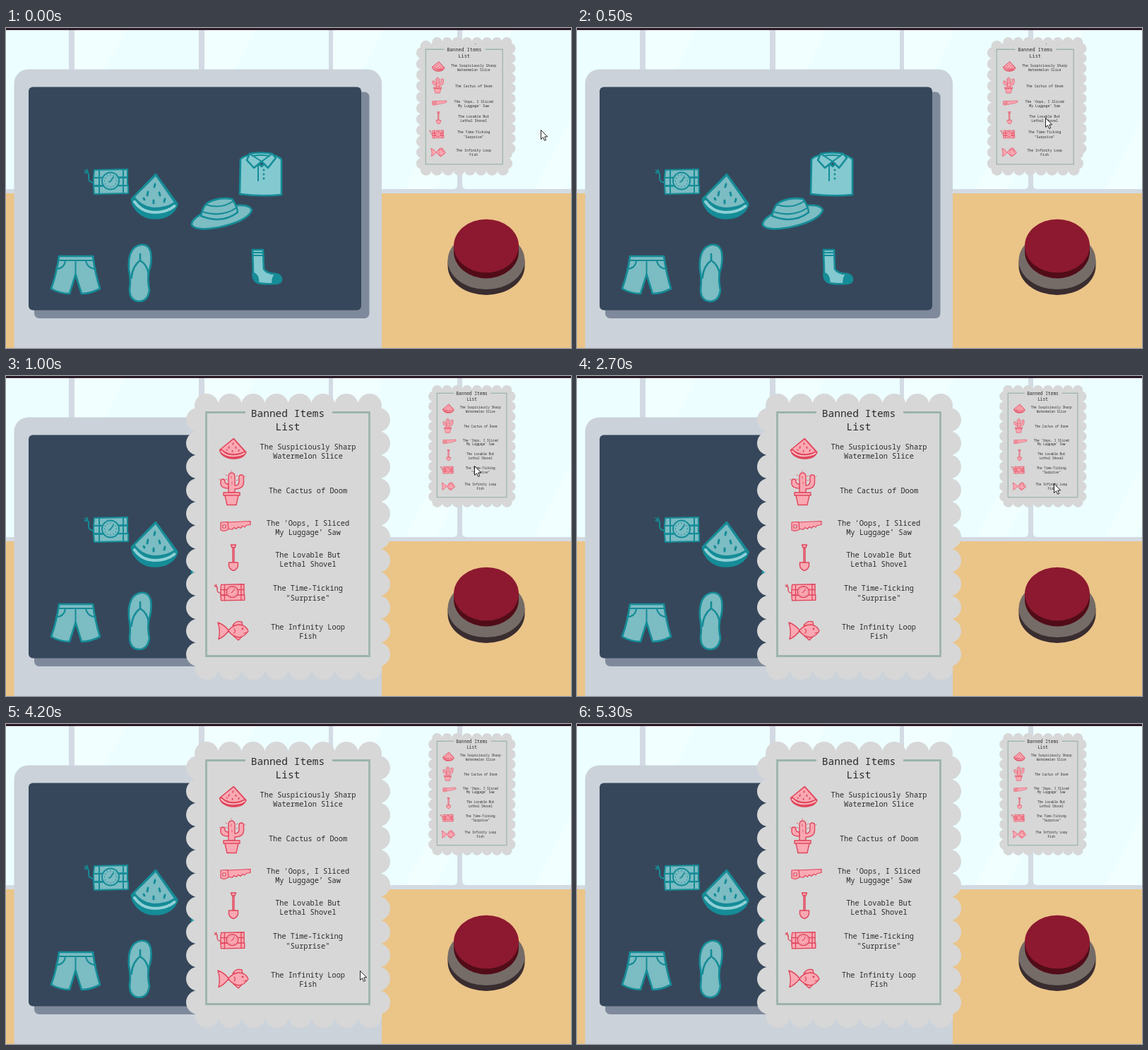
An HTML page for the animation above (5900 ms loop, 800 px wide and 453 px high).

```html
<!DOCTYPE html>
<html lang="en">
<head>
<meta charset="utf-8">
<title>Banned Items List</title>
<style>
  html, body { margin: 0; width: 100%; height: 100%; overflow: hidden; background: #ebc488; }
  svg { display: block; width: 800px; height: 453px; }
  text { font-family: "Noto Sans Mono", "DejaVu Sans Mono", monospace; text-anchor: middle; fill: #2b2b2b; }
  .notes { font-size: 10.3px; }
  .title { font-size: 14.5px; }
  .icon { fill: var(--fill); stroke: var(--line); stroke-linejoin: round; stroke-linecap: round; }
  .teal { --fill: #7cbcc3; --line: #158c97; --pale: #8fd0d6; stroke-width: 2.6; }
  .pink { --fill: #f9a9b3; --line: #e0465c; --pale: #fbc4ca; stroke-width: 1.4; }
  .open { fill: none; }
  .solid { fill: var(--line); }
  .pale { fill: none; stroke: var(--pale); }
  .light { fill: #84c9d0; }
  .closed { animation: hide 5.9s step-end infinite; }
  .opened { animation: show 5.9s step-end infinite; }
  #cursor { animation: move 5.9s step-end infinite; }

  @keyframes hide { 0% { opacity: 1 } 15.25%, 100% { opacity: 0 } }
  @keyframes show { 0% { opacity: 0 } 15.25%, 100% { opacity: 1 } }
  @keyframes move {
    0% { transform: translate(757px, 144px) }
    1.69% { transform: translate(746px, 143px) }
    3.38% { transform: translate(717px, 138px) }
    5.08% { transform: translate(688px, 131px) }
    6.77% { transform: translate(668px, 128px) }
    8.47% { transform: translate(663px, 127px) }
    45.76% { transform: translate(675px, 152px) }
    47.45% { transform: translate(705px, 182px) }
    49.15% { transform: translate(740px, 196px) }
    50.84% { transform: translate(754px, 197px) }
    59.32% { transform: translate(696px, 233px) }
    61.01% { transform: translate(620px, 262px) }
    62.71% { transform: translate(540px, 284px) }
    64.40% { transform: translate(470px, 295px) }
    66.10% { transform: translate(418px, 299px) }
    67.79% { transform: translate(397px, 299px) }
    69.49% { transform: translate(440px, 315px) }
    71.18% { transform: translate(501px, 349px) }
    72.88% { transform: translate(554px, 370px) }
    74.57% { transform: translate(518px, 377px) }
    76.27% { transform: translate(455px, 377px) }
    77.96% { transform: translate(421px, 377px) }
    84.74% { transform: translate(458px, 300px) }
    86.44% { transform: translate(540px, 160px) }
    88.13% { transform: translate(618px, 13px) }
    89.83%, 100% { transform: translate(640px, -40px) }
  }
</style>
</head>
<body>
<svg viewBox="0 0 800 453">
  <defs>
    <g id="pane">
      <rect width="176" height="236" rx="5" fill="#ecfeff"/>
      <path d="M8 0H78L0 150V16ZM176 92V176L146 236H102Z" fill="#fff" opacity=".25"/>
    </g>

    <g id="melon">
      <path class="solid" d="M212 207L178 242C180 258 194 269.500 210 269.500C227 269.500 239 262 242.500 249Z"/>
      <path class="pale" d="M182 246Q192 260.500 210 261Q228 261 238.500 252" stroke-width="4"/>
      <path d="M212 208.500L181.500 239Q192 253.500 210 255Q227 255 239 247Z" stroke-width="1.800"/>
      <path class="open" d="M211 221l-1 4M201 232l-1 5M217 233l1 4M195 241l1 2M209 244v4M225 242l-1 4" stroke-width="3"/>
    </g>

    <g id="bomb">
      <path d="M125 201L172 200V211L124 212ZM124 212H172V223H124ZM124 224L173 223V234L125 235Z"/>
      <path class="open" d="M132 201V235M166 200V234M124 219Q116 218 117 211Q118 206 114 203"/>
      <path class="open" d="M111 201l5 3M115 200l-2 6M111 205l5-3" stroke-width="1.300"/>
      <circle cx="148" cy="216.500" r="12"/>
      <circle cx="148" cy="216.500" r="8.500" stroke-width="1.400" stroke-dasharray=".1 4.300"/>
      <path class="open" d="M148 217l4-6M148 217l-2 1" stroke-width="1.800"/>
    </g>

    <g id="poster">
      <path d="M268 41.500H531V413.500H268Z" fill="#d7d7d7"/>
      <g fill="none" stroke="#d7d7d7" stroke-width="34" stroke-linecap="round">
        <path d="M284 42H515.500M515.500 413H284" stroke-dasharray="0 33"/>
        <path d="M272 62V394.500M527 62V394.500" stroke-dasharray="0 33.200"/>
      </g>
      <path d="M339 51.500H283.500V396.500H514.500V51.500H462" fill="none" stroke="#9cb4aa" stroke-width="2.800"/>

      <g class="title">
        <text x="399" y="58">Banned Items</text>
        <text x="399" y="77">List</text>
      </g>
      <g class="notes">
        <text x="427.500" y="103.500">The Suspiciously Sharp</text>
        <text x="427.500" y="117">Watermelon Slice</text>
        <text x="427.500" y="165.500">The Cactus of Doom</text>
        <text x="427.500" y="211.500">The ‘Oops, I Sliced</text>
        <text x="427.500" y="225">My Luggage’ Saw</text>
        <text x="427.500" y="257">The Lovable But</text>
        <text x="427.500" y="270">Lethal Shovel</text>
        <text x="427.500" y="304">The Time-Ticking</text>
        <text x="427.500" y="317.500">"Surprise"</text>
        <text x="427.500" y="358.500">The Infinity Loop</text>
        <text x="427.500" y="372">Fish</text>
      </g>

      <g class="icon pink">
        <use href="#melon" transform="translate(302 88) scale(.58 .46) translate(-177 -206)" stroke-width="2.600"/>
        <!-- cactus -->
        <path d="M315 165V143Q315 137 319.500 137Q324 137 324 143V155Q330 155 330 149V143Q330 140 333 140Q336.500 140 336.500 143V151Q336 160 324 160V165Z"/>
        <path d="M315 159Q305 159 304 153V149Q304 146 307 146Q310 146 310 149Q310 153 315 153Z"/>
        <path d="M308 165H331V169H308ZM310 169H329L326 182.500H313Z"/>
        <path class="open" d="M319 142v3M320 150v3M313 141l-2-1M313 147l-2-1M326 142l2-1M326 148l2-1M303 147l-1-1M338 143l1-1M319 135v-1" stroke-width=".8"/>
        <!-- saw -->
        <path d="M314 207L346 205.500V210.500L340 211.500L338 214L335 212.500L332 215.500L329 213.500L326 216.500L323 214.500L320 217.500L314 216Z" stroke-width="1.200"/>
        <path d="M304 207L314 206.500L315 217Q309 221 304 218ZM307 211H311V215H307Z" fill-rule="evenodd" stroke-width="1.200"/>
        <!-- shovel -->
        <path d="M321 243H323V264H321ZM318.500 239H325.500L324 243H320Z"/>
        <path d="M315.500 264H328.500V269Q327 274 322 275.500Q317 274 315.500 269Z"/>
        <use href="#bomb" transform="translate(320.500 306) scale(.69 .66) translate(-148 -217)" stroke-width="2"/>
        <!-- fish -->
        <path d="M321 353Q326 345.500 334 348L335 354ZM322 368L329 374L335 368Z"/>
        <path d="M300 349Q309 352 315 360Q322 352 331 352Q340 353 343 361Q338 369 330 370Q321 369 315 361Q309 369 301 372.500Q304 361 300 349Z"/>
        <path class="open" d="M323 358q3 3 0 6M337 364l4-1" stroke-width="1.200"/>
        <circle class="solid" cx="335" cy="358" r=".7"/>
      </g>
    </g>
  </defs>

  <!-- room -->
  <rect width="800" height="453" fill="#ebc488"/>
  <rect width="800" height="234" fill="#d3dae3"/>
  <use href="#pane" x="-87" y="-8"/>
  <use href="#pane" x="97" y="-8"/>
  <use href="#pane" x="281" y="-8"/>
  <use href="#pane" x="463" y="-8"/>
  <use href="#pane" x="646" y="-8"/>
  <rect width="800" height="3" fill="#2b1a25"/>

  <!-- scanner -->
  <rect x="11.500" y="58.500" width="520.500" height="420" rx="20" fill="#cbd2da"/>
  <rect x="40" y="90.500" width="474.500" height="320.500" rx="7" fill="#7e8a9b"/>
  <rect x="32" y="83.500" width="471" height="316" rx="6" fill="#36475b"/>

  <g class="icon teal">
    <use href="#bomb" stroke-width="2"/>
    <use href="#melon"/>
    <!-- shirt -->
    <path class="light" d="M344 180Q335 182 332 186L331 235Q361 239 390 236L390 186Q386 182 379 180L362 196Z"/>
    <path class="light" d="M345 178Q361 175 377 178L382 184L371 198L362 189L351 198L341 187Z"/>
    <path class="open" d="M345 178L362 189L377 178M349 181Q361 179 373 181M357 194V216" stroke-width="2"/>
    <path class="open" d="M365 201v.1M365 207v.1M365 213v.1" stroke-width="3"/>
    <!-- hat -->
    <path d="M279 262Q262 271 263 279Q269 288 302 282Q343 273 348 258Q346 250 327 251Z"/>
    <path d="M276 266Q279 250 288 246Q303 239 320 242Q327 251 328 261Q306 278 276 266Z"/>
    <path class="open" d="M283 250Q304 257 322 245M278 260Q306 269 327 254" stroke-width="2"/>
    <!-- shorts -->
    <path d="M75 323H123Q126 346 133 369Q120 376 107 376L98.500 349L90 376Q76 376 64 369Q72 346 75 323Z"/>
    <path class="open" d="M75 329H123M98.500 331V349M71 341Q82 341 84 330M127 341Q116 341 113 330" stroke-width="2"/>
    <!-- flip-flop -->
    <path d="M190 307Q202 305 205 318Q207 332 202 346Q200 356 203 371Q201 387 188 387Q175 386 175 370Q177 357 174 342Q172 311 190 307Z"/>
    <path class="open" d="M190 320V329Q179 337 177.500 354M190 329Q201 336 202 350"/>
    <!-- sock -->
    <path class="light" d="M349 314H364L365 341Q369 348 382 348Q391 350 390 357Q389 362 379 362Q362 363 355 360Q348 356 350 344Z"/>
    <path class="solid" d="M350 346Q358 348 358 360Q348 358 350 346ZM380 349Q391 349 390 357Q388 362 377 362Q376 354 380 349Z" stroke-width="1"/>
    <path class="open" d="M349 318H364M350 322H364" stroke-width="2"/>
  </g>

  <!-- button -->
  <path d="M625.500 329H734.500V337A54.500 41 0 0 1 625.500 337Z" fill="#392d30"/>
  <ellipse cx="680" cy="329" rx="54.500" ry="41" fill="#756c68"/>
  <path d="M634 308.500H726V316.500A46 38 0 0 1 634 316.500Z" fill="#510c18"/>
  <ellipse cx="680" cy="308.500" rx="46" ry="37.800" fill="#8c192f"/>

  <!-- notices -->
  <use href="#poster" transform="translate(489.200 2.300) scale(.427)"/>
  <use class="closed" href="#poster" transform="translate(460.600 6) scale(.4715)"/>
  <use class="opened" href="#poster"/>

  <path id="cursor" d="M.5 .5V13.500L3.500 10.700L5.600 15.400L7.700 14.500L5.700 9.900H9.700Z" fill="#fff" stroke="#222" stroke-width="1"/>
</svg>
</body>
</html>
```
